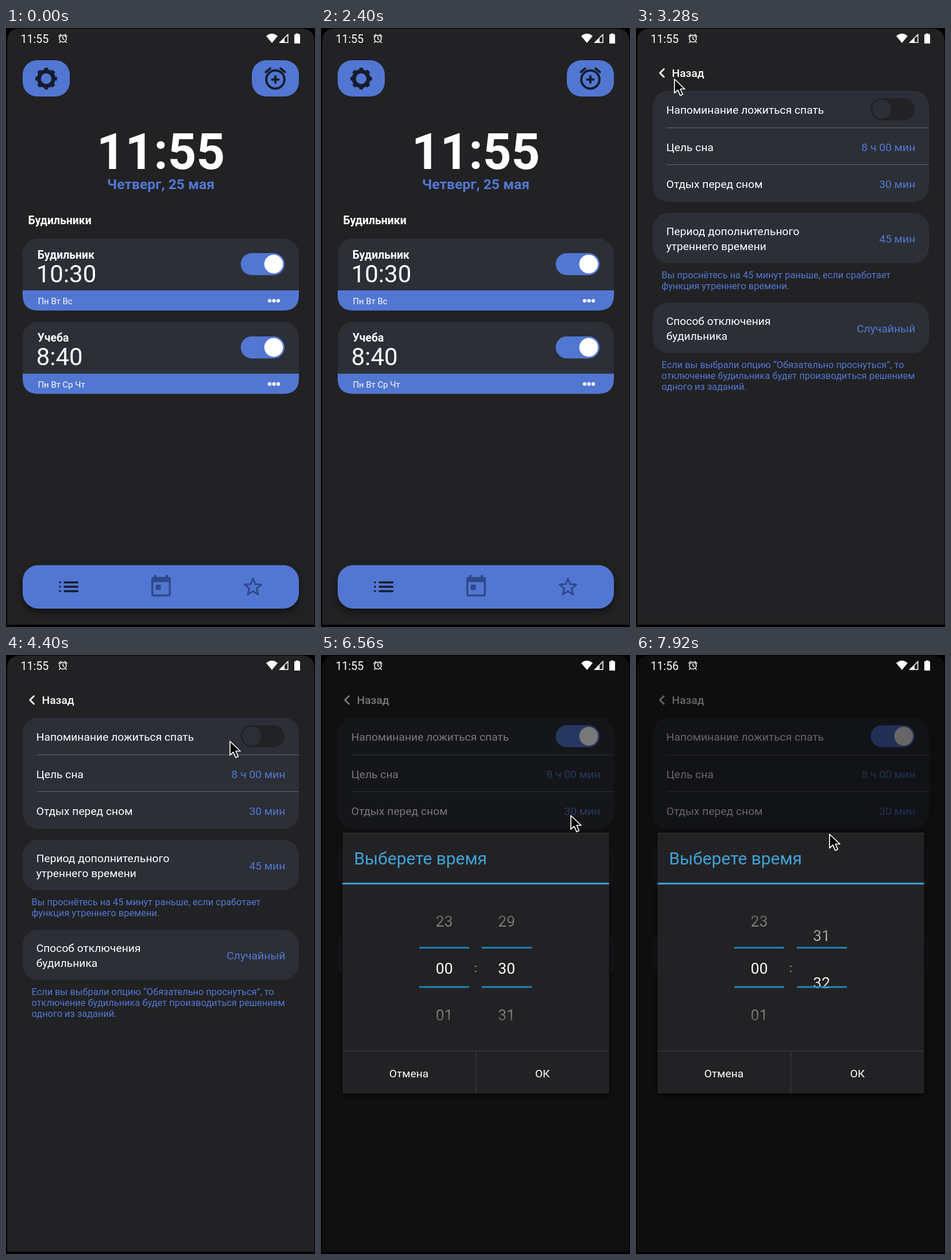
Write an HTML page that moves like this. It is 538 by 1041 pixels and loops after 8 s.

```html
<!DOCTYPE html>
<html lang="ru">
<head>
<meta charset="utf-8">
<title>Будильник</title>
<style>
  html, body { margin: 0; width: 100%; height: 100%; overflow: hidden; background: #000; }
  svg { display: block; width: 100vw; height: 100vh; font-family: Roboto, sans-serif; fill: #fff; }
  .screen { fill: #222224; }
  .card { fill: #2c2f36; }
  .blue { fill: #5277d2; }
  .title { font-size: 19.4px; font-weight: 700; }
  .row { font-size: 19.25px; }
  .hint { font-size: 16.4px; }
  .time { font-size: 42px; }
  .days { font-size: 14.9px; }
  .digits { font-size: 26.4px; }
  .mid { text-anchor: middle; }
  .end { text-anchor: end; }
  .line { fill: none; stroke-linecap: round; stroke-linejoin: round; }
  .nav { filter: drop-shadow(0 6px 6px #0007); }
  .panel { filter: drop-shadow(0 3px 4px #000a); }
</style>
</head>
<body>
<svg viewBox="0 0 538 1041" preserveAspectRatio="none">
  <defs>
    <linearGradient id="fade" gradientUnits="userSpaceOnUse" x1="0" y1="421.5" x2="0" y2="666.5">
      <stop offset="0" stop-color="#000"/>
      <stop offset=".45" stop-color="#fff"/>
      <stop offset=".55" stop-color="#fff"/>
      <stop offset="1" stop-color="#000"/>
    </linearGradient>
    <mask id="wheel" maskUnits="userSpaceOnUse" x="160" y="420" width="220" height="250" style="color-interpolation:sRGB">
      <rect x="160" y="420" width="220" height="250" fill="url(#fade)"/>
    </mask>
    <clipPath id="shell"><path d="M2 1037V24Q2 1 25 1H514Q537 1 537 24V1037Z"/></clipPath>
  </defs>

  <g clip-path="url(#shell)">
    <rect class="screen" width="538" height="1041"/>
    <g id="home"></g>
    <g id="settings"></g>
    <rect id="dim" width="538" height="1041" fill="#000"/>
  </g>

  <g id="status">
    <text id="clock" x="25.6" y="25.6" font-size="19.6"></text>
    <g class="line" stroke="#fff" stroke-width="1.5">
      <circle cx="99" cy="18.5" r="6"/>
      <path d="M99 15V18.8L101.5 20.5M91.8 14.5L95.5 11M106.2 14.5L102.5 11M94.7 23.2L92.8 25.2M103.3 23.2L105.2 25.2"/>
    </g>
    <path d="M453 14Q463 5.5 473 14L463 26Z"/>
    <path d="M475 26L491.5 9.5V26Z"/>
    <path class="screen" d="M485 18L490 13.2V24.5H485Z"/>
    <path d="M504.5 9.5H509.5V11H512V27H502V11H504.5Z"/>
  </g>

  <g id="dialog">
    <rect class="screen panel" x="37.5" y="309" width="464" height="453" rx="2"/>
    <path d="M38 309.5H501" stroke="#38383a"/>
    <text x="57.5" y="364" font-size="29.9" fill="#41a3d8">Выберете время</text>
    <path d="M37.5 397.3H501.5" stroke="#3fa4da" stroke-width="3"/>
    <g class="digits mid" mask="url(#wheel)">
      <g id="hours"></g>
      <g id="minutes"></g>
    </g>
    <text class="mid" x="269.5" y="551" font-size="20" fill="#bbb">:</text>
    <path d="M171 508.7H258M280 508.7H367M171 577H258M280 577H367" stroke="#2483b6" stroke-width="3"/>
    <path d="M38 688H501M269.5 688V762" stroke="#414143"/>
    <text class="row mid" x="153" y="733.7">Отмена</text>
    <text class="row mid" x="385.5" y="733.7">ОК</text>
  </g>

  <path id="cursor" d="M0 1V25L5.8 19.7L10 29.2L14.3 27.3L10.2 18H18Z" fill="#000" stroke="#fff" stroke-width="1.7" stroke-linejoin="round"/>
</svg>
<script>
const $ = id => document.getElementById(id);
const text = (cls, x, y, label) => `<text class="${cls}" x="${x}" y="${y}">${label}</text>`;
const box = (cls, x, y, w, h, r) => `<rect class="${cls}" x="${x}" y="${y}" width="${w}" height="${h}" rx="${r}"/>`;
const card = (y, h) => box('card', 29, y, 481, h, 27);
const track = (cls, y) => box(cls, 408.7, y, 76.3, 38.3, 19.1);
const stroke = (color, width, d) => `<path class="line" stroke="${color}" stroke-width="${width}" d="${d}"/>`;
const ink = '#151c2b', faded = '#2f4a8b';

function alarmCard(y, name, time, days) {
  const dots = [459, 466.5, 474].map(x => `<circle cx="${x}" cy="${y + 108}" r="3.1"/>`).join('');
  return card(y, 125) +
    `<path class="blue" d="M29 ${y + 90}H510V${y + 98}Q510 ${y + 125} 483 ${y + 125}H56Q29 ${y + 125} 29 ${y + 98}Z"/>` +
    text('title', 54.7, y + 34.6, name) + text('time', 52.7, y + 75.5, time) + text('days', 55.5, y + 114, days) +
    track('blue', y + 25.2) + `<circle cx="466" cy="${y + 44.3}" r="16.3"/>` + dots;
}

function starPoints(cx, cy, outer, inner) {
  return Array.from({ length: 10 }, (_, i) => {
    const r = i % 2 ? inner : outer, a = i * Math.PI / 5;
    return `${cx + r * Math.sin(a)} ${cy - r * Math.cos(a)}`;
  }).join('L');
}

$('home').innerHTML =
  box('blue', 29, 56, 82, 63, 25) + box('blue', 428, 56, 82, 63, 25) +
  `<g fill="none" stroke="${ink}">
    <circle cx="70" cy="88" r="12.7" stroke-width="7"/>
    <circle cx="70" cy="88" r="16.2" stroke-width="5.4" pathLength="16" stroke-dasharray="1" stroke-dashoffset=".5"/>
    <circle cx="469" cy="89.5" r="15.8" stroke-width="4"/>
  </g>` +
  stroke(ink, 4, 'M452.5 76.5L460 70.3M485.5 76.5L478 70.3M463.5 89.5H474.5M469 84V95') +
  `<text class="mid" x="269.5" y="244.5" font-size="86.7" font-weight="700">11:55</text>
   <text class="mid blue" x="269.5" y="280" font-size="24.7" font-weight="700">Четверг, 25 мая</text>` +
  text('title', 38.5, 341, 'Будильники') +
  alarmCard(366, 'Будильник', '10:30', 'Пн Вт Вс') +
  alarmCard(510.7, 'Учеба', '8:40', 'Пн Вт Ср Чт') +
  box('blue nav', 29, 933.5, 481, 75.5, 27) +
  stroke(ink, 3.5, 'M102 963.5H124.5M102 971H124.5M102 978.8H124.5M94 963.5H94.01M94 971H94.01M94 978.8H94.01') +
  `<path fill="${faded}" fill-rule="evenodd" d="M257 954H258V950.5H262V954H278V950.5H282V954H283Q287 954 287 958V984Q287 988 283 988H257Q253 988 253 984V958Q253 954 257 954ZM256.5 963V984.5H283.5V963ZM260.5 967.5H269.5V976.5H260.5Z"/>` +
  stroke(faded, 3, `M${starPoints(430, 972, 15.5, 6.7)}Z`);

$('settings').innerHTML =
  stroke('#fff', 2.8, 'M48.5 71.5L41.7 78.3L48.5 85.1') +
  `<text class="row" x="62.5" y="85.3" font-weight="500">Назад</text>` +
  card(109, 193) + card(321.3, 87.4) + card(477.3, 87.4) +
  '<path d="M54 173.5H510M54 237.5H510" stroke="#66686d"/>' +
  [[149.2, 'Напоминание ложиться спать'], [213.5, 'Цель сна'], [278, 'Отдых перед сном'],
   [360.2, 'Период дополнительного'], [386, 'утреннего времени'],
   [516.4, 'Способ отключения'], [542.2, 'будильника']].map(([y, s]) => text('row', 52.7, y, s)).join('') +
  [[213.5, '8 ч 00 мин'], [278, '30 мин'], [372.8, '45 мин'], [528.8, 'Случайный']]
    .map(([y, s]) => text('row blue end', 486.3, y, s)).join('') +
  [[434.7, 'Вы проснётесь на 45 минут раньше, если сработает'], [454, 'функция утреннего времени.'],
   [590.8, 'Если вы выбрали опцию “Обязательно проснуться”, то'],
   [610.1, 'отключение будильника будет производиться решением'], [629.4, 'одного из заданий.']]
    .map(([y, s]) => text('hint blue', 44.5, y, s)).join('') +
  track('screen', 122) +
  `<g id="switchOn">${track('blue', 122)}</g>
   <circle id="thumb" cy="141.1" r="16.3"/>`;

const ROW = 81.6, GAP = 57;
const wheel = (x, labels) => labels.map((s, i) => text('', x, 553.6 + (i - 1) * ROW, s)).join('');
$('hours').innerHTML = wheel(214.7, ['23', '00', '01']);
$('minutes').innerHTML = wheel(323.2, [29, 30, 31, 32, 33]);

const progress = (t, from, to) => Math.min(1, Math.max(0, (t - from) / (to - from)));
const smooth = p => p * p * (3 - 2 * p);
const mix = (a, b, p) => a + (b - a) * p;

// Pointer stops: time, x, y
const path = [
  [2480, -14, 150], [3040, 67, 88], [3840, 67, 88], [4400, 390, 149], [4640, 441, 143], [5040, 441, 143],
  [5680, 452.5, 262], [6240, 452.5, 262], [6560, 435, 278], [7200, 337, 459], [7440, 337, 459], [7920, 337, 310.5]
];

function pointerAt(t) {
  const i = Math.max(1, path.findIndex(stop => stop[0] >= t));
  const [a, b] = [path[i - 1], path[i]];
  const p = smooth(progress(t, a[0], b[0]));
  return [mix(a[1], b[1], p), mix(a[2], b[2], p)];
}

const toggle = (node, visible) => node.style.display = visible ? '' : 'none';
const show = (id, visible) => toggle($(id), visible);

function draw(now) {
  const t = Math.floor(now % 8000 / 80) * 80;
  show('home', t < 3280);
  show('settings', t >= 3280);
  $('clock').textContent = t < 6880 ? '11:55' : '11:56';

  const on = smooth(progress(t, 4760, 4960));
  $('switchOn').style.opacity = on;
  $('thumb').setAttribute('cx', mix(428, 466, on));
  $('thumb').setAttribute('fill', `rgb(${mix(44, 255, on)},${mix(47, 255, on)},${mix(54, 255, on)})`);

  $('dim').style.opacity = .6 * progress(t, 6330, 6590);
  const open = progress(t, 6340, 6540);
  const scale = mix(.92, 1, smooth(open));
  show('dialog', open > 0);
  $('dialog').style.opacity = open;
  $('dialog').setAttribute('transform', `translate(269.5 535.5) scale(${scale}) translate(-269.5 -535.5)`);

  const [x, y] = pointerAt(t);
  show('cursor', t >= 2480);
  $('cursor').setAttribute('transform', `translate(${x} ${y})`);

  // The wheel follows the drag after a short dead zone and holds three rows at a time.
  const drag = t >= 7440 ? Math.max(0, 459 - y - 10.5) : 0;
  const middle = 1 + Math.floor((drag + ROW - GAP) / ROW);
  $('minutes').setAttribute('transform', `translate(0 ${-drag})`);
  [...$('minutes').children].forEach((row, i) => toggle(row, Math.abs(i - middle) <= 1));
}

function tick() {
  draw(performance.now());
  requestAnimationFrame(tick);
}
tick();
</script>
</body>
</html>
```
